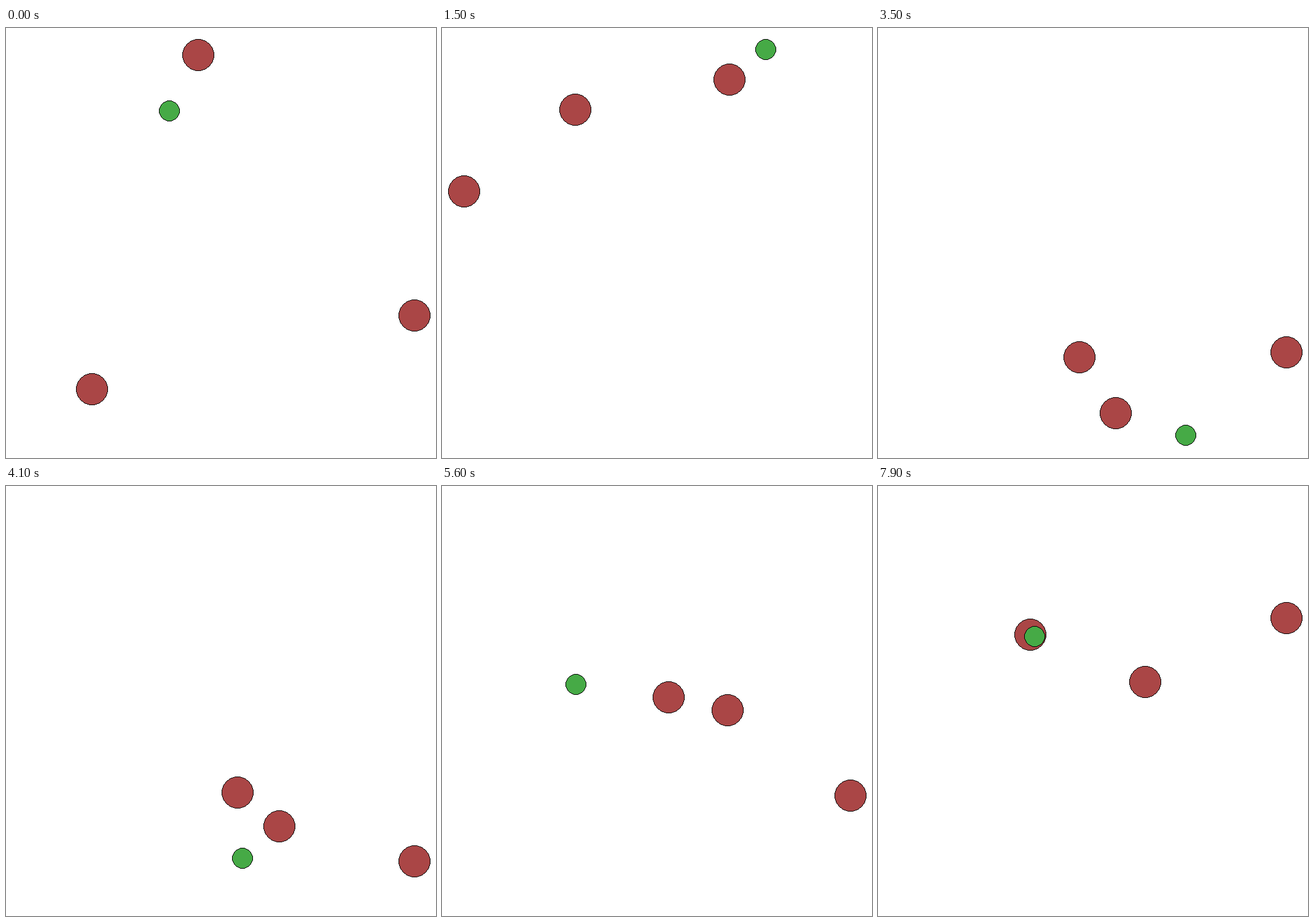
These frames come from a looping animation (700x700 px, 8 s). An HTML page with a canvas:

```html
<!DOCTYPE html>
<html lang="en">
<head>
<meta charset="utf-8">
<title>Pursuit</title>
<style>
  html, body { margin: 0; width: 100%; height: 100%; overflow: hidden; background: #fff; }
  canvas { display: block; }
</style>
</head>
<body>
<canvas id="stage" width="700" height="700"></canvas>
<script>
const ctx = document.getElementById('stage').getContext('2d');
const STEP = 100, STEPS = 80, MID = 350, REACH = 315;
const RED = 'rgb(170,70,70)', GREEN = 'rgb(70,170,70)';

// Each path passes through a few key points: [step, x, y].
const agents = [
  { r: 26, color: RED, path: [[0, 140, 588], [9, 35, 338], [15, 36, 266], [23, 242, 484],
    [35, 328, 536], [47, 404, 440], [65, 314, 261], [79, 248, 242]] },
  { r: 26, color: RED, path: [[0, 313, 44], [15, 217, 133], [23, 411, 78],
    [35, 387, 627], [47, 495, 412], [65, 421, 347], [79, 435, 319]] },
  { r: 26, color: RED, path: [[0, 665, 468], [15, 468, 84], [23, 665, 240],
    [35, 665, 528], [47, 665, 628], [65, 665, 348], [79, 665, 215]] },
  { r: 17, color: GREEN, path: [[0, 266, 135], [15, 527, 35], [23, 496, 633],
    [35, 501, 663], [47, 254, 513], [54, 212, 345], [65, 271, 276], [79, 255, 245]] }
];

function slope(path, i, axis) {
  const a = path[Math.max(i - 1, 0)], b = path[Math.min(i + 1, path.length - 1)];
  return (b[axis] - a[axis]) / (b[0] - a[0]);
}

// Smooth cubic through the key points.
function along(path, n, axis) {
  let i = 0;
  while (i < path.length - 2 && n >= path[i + 1][0]) i++;
  const a = path[i], b = path[i + 1];
  const h = b[0] - a[0], u = (n - a[0]) / h, w = 1 - u;
  return w * w * ((1 + 2 * u) * a[axis] + u * h * slope(path, i, axis)) +
         u * u * ((1 + 2 * w) * b[axis] - w * h * slope(path, i + 1, axis));
}

// Midpoint circle: the pixel offsets of the whole rim, mirrored from one octant.
function rim(r) {
  const points = [];
  let x = 0, y = r, f = 1 - r;
  while (x < y) {
    if (f >= 0) { y--; f -= 2 * y; }
    x++;
    f += 2 * x + 1;
    points.push([x, y], [y, x]);
  }
  return points;
}

// Hard-edged disc with a one pixel black outline.
function disc(cx, cy, r, color) {
  const points = rim(r);
  ctx.fillStyle = color;
  for (const [x, y] of points) {
    for (const row of [cy - y, cy + y - 1]) ctx.fillRect(cx - x, row, 2 * x, 1);
  }
  ctx.fillStyle = '#000';
  for (const [x, y] of points) {
    for (const row of [cy - y, cy + y - 1]) {
      ctx.fillRect(cx - x, row, 1, 1);
      ctx.fillRect(cx + x - 1, row, 1, 1);
    }
  }
}

function draw(n) {
  ctx.fillStyle = '#fff';
  ctx.fillRect(0, 0, 700, 700);
  const spots = agents.map(a => [1, 2].map(axis => along(a.path, n, axis) - MID));
  // The view zooms so that the outermost agent always touches the same border.
  const zoom = REACH / Math.max(...spots.flat().map(Math.abs));
  agents.forEach((a, i) => {
    const [x, y] = spots[i].map(c => Math.round(MID + c * zoom));
    disc(x, y, a.r, a.color);
  });
}

const start = performance.now();
function tick() {
  draw(Math.floor((performance.now() - start) / STEP) % STEPS);
  requestAnimationFrame(tick);
}
tick();
</script>
</body>
</html>
```
